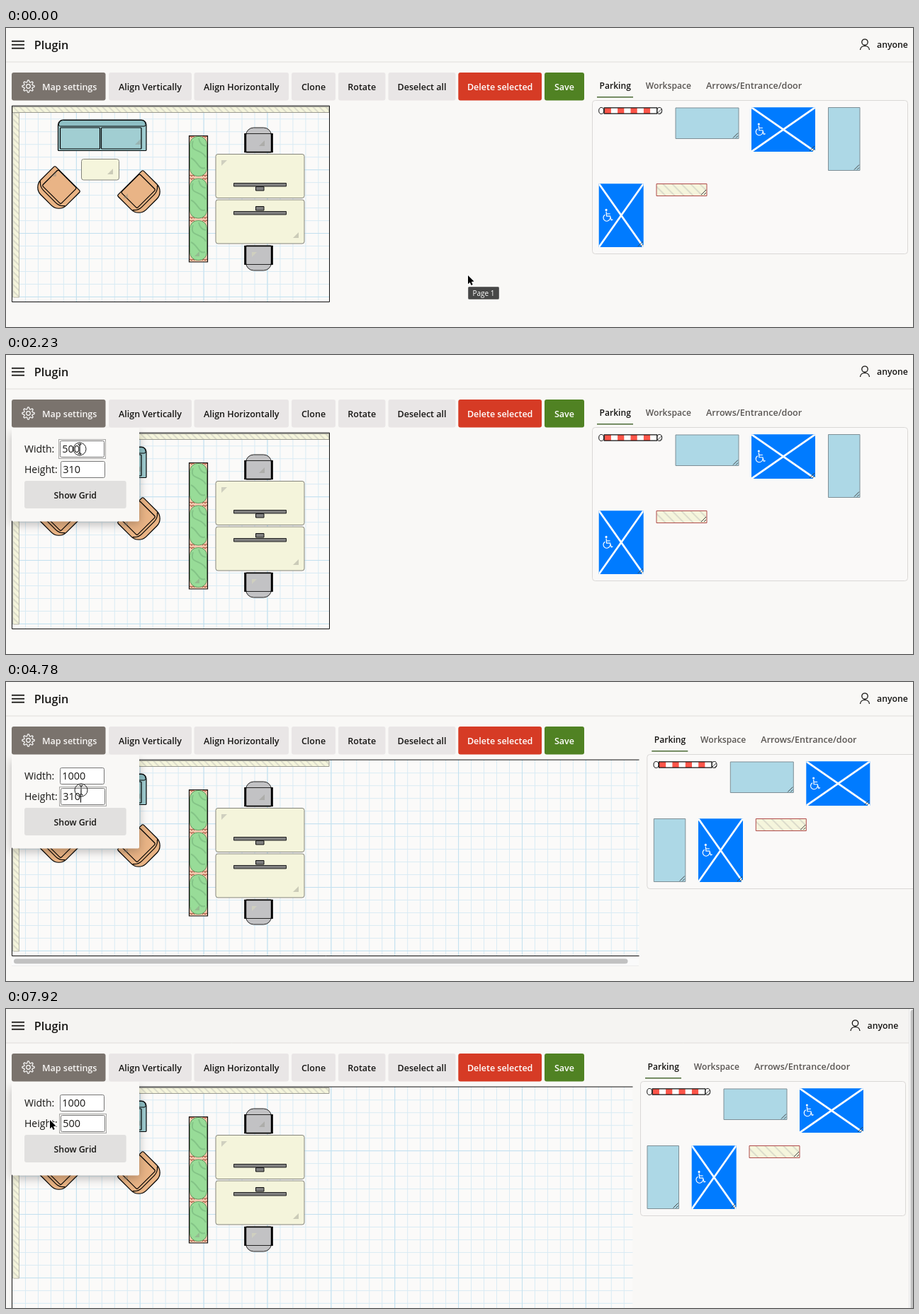
An HTML page with a canvas for the animation above (8 s loop, 1280 by 423 pixels).

```html
<!DOCTYPE html>
<html lang="en">
<head>
<meta charset="utf-8">
<title>Map editor</title>
<style>
html, body { margin: 0; width: 100%; height: 100%; overflow: hidden; background: #f9f8f6; }
canvas { display: block; }
</style>
</head>
<body>
<canvas id="stage" width="1280" height="423"></canvas>
<script>
const c = document.getElementById('stage').getContext('2d');
const LOOP = 8000;
const PAGE = '#f9f8f6', INK = '#161513', BEIGE = '#f5f5dc';

// Cursor stops: time, x, y, shape, click ring
const cursorStops = [
  [0, 652, 350, 'arrow'], [140, 606, 330, 'arrow'], [290, 480, 272, 'arrow'],
  [440, 290, 186, 'arrow'], [590, 122, 112, 'arrow'], [740, 30, 84, 'hand'],
  [890, 74, 91, 'hand'], [1190, 74, 91, 'hand', true], [1330, 74, 91, 'hand'],
  [1630, 80, 100, 'arrow'], [1780, 92, 116, 'arrow'], [1930, 104, 129, 'beam'],
  [2080, 107, 133, 'beam'], [2230, 104, 133, 'beam', true], [2380, 86, 132, 'beam'],
  [2530, 69, 130, 'beam'], [2680, 69, 130, 'arrow'], [4030, 74, 133, 'arrow'],
  [4180, 84, 139, 'beam'], [4330, 95, 147, 'beam'], [4480, 103, 152, 'beam'],
  [4630, 105, 154, 'beam'], [4780, 106, 153, 'beam', true], [4930, 106, 154, 'beam'],
  [5220, 96, 155, 'beam'], [5370, 83, 156, 'beam'], [5520, 69, 157, 'arrow'],
  [5670, 62, 157, 'arrow']
];

// Field states: time, text, caret, first selected digit (-1 for none)
const widthStops = [
  [0, '500', false, -1], [2230, '500', true, -1], [2380, '500', false, 1],
  [2530, '500', false, 0], [3130, '1', true, -1], [3280, '10', true, -1],
  [3430, '100', true, -1], [3580, '1000', true, -1], [4780, '1000', false, -1]
];
const heightStops = [
  [0, '310', false, -1], [4780, '310', true, -1], [5220, '310', false, 2],
  [5370, '310', false, 1], [5520, '310', false, 0], [7020, '5', true, -1],
  [7170, '50', true, -1], [7320, '500', true, -1], [7920, '500', false, -1]
];

const layouts = [
  { time: 0, panel: 827.5, right: 1272.5, bottom: 319.5, mapW: 449, user: 0 },
  { time: 4780, panel: 904.8, right: 1350, bottom: 292.5, mapW: 885, user: 0, hbar: true, narrow: true },
  { time: 7770, panel: 895.5, right: 1269.5, bottom: 292.5, mapW: 876, user: -13.5, vbar: true, narrow: true }
];

const stopAt = (stops, t) => stops.filter(s => s[0] <= t).pop();

function box(x, y, w, h, fill, stroke, r = 0, lw = 1) {
  c.beginPath();
  c.roundRect(x, y, w, h, r);
  if (fill) { c.fillStyle = fill; c.fill(); }
  if (stroke) { c.strokeStyle = stroke; c.lineWidth = lw; c.stroke(); }
}

function line(color, lw, ...p) {
  c.beginPath();
  for (let i = 0; i < p.length; i += 2) c.lineTo(p[i], p[i + 1]);
  c.strokeStyle = color;
  c.lineWidth = lw;
  c.stroke();
}

function shape(fill, stroke, lw, ...p) {
  c.beginPath();
  for (let i = 0; i < p.length; i += 2) c.lineTo(p[i], p[i + 1]);
  c.closePath();
  if (stroke) { c.strokeStyle = stroke; c.lineWidth = lw; c.stroke(); }
  c.fillStyle = fill;
  c.fill();
}

function text(s, x, y, size = 12.5, weight = 600, color = INK, align = 'left') {
  c.font = `${weight} ${size}px "Open Sans", "Noto Sans", sans-serif`;
  c.fillStyle = color;
  c.textAlign = align;
  c.fillText(s, x, y);
}

function within(x, y, w, h, draw) {
  c.save();
  c.beginPath();
  c.rect(x, y, w, h);
  c.clip();
  draw();
  c.restore();
}

function hatch(x, y, w, h, gap, stroke) {
  box(x, y, w, h, BEIGE);
  within(x, y, w, h, () => {
    for (let i = -h; i < w; i += gap) line('#dcdccb', 2, x + i, y, x + i + h, y + h);
  });
  box(x, y, w, h, null, stroke);
}

function gripTriangle(x, y, s = 8, flip) {
  if (flip) shape('#cfcfbf', null, 0, x, y + s, x, y, x + s, y);
  else shape('rgba(140,140,130,.4)', null, 0, x + s, y, x + s, y + s, x, y + s);
}

function gripLines(x, y) {
  line('#444', 1, x - 8, y - 1, x - 1, y - 8);
  line('#444', 1, x - 4, y - 1, x - 1, y - 4);
}

function header(v) {
  if (v.vbar) box(0, 0, 1274, 48, '#f5f4f2');
  line('#dfddda', 1, 0, 48, v.vbar ? 1274 : 1280, 48);
  for (const y of [18, 23, 28]) box(8, y - 0.2, 18, 1.8, INK);
  text('Plugin', 39.7, 30, 16.2);
  const x = 1212 + v.user;
  c.strokeStyle = INK;
  c.lineWidth = 1.3;
  c.beginPath();
  c.arc(x, 20, 4.2, 0, 7);
  c.moveTo(x - 6.5, 31);
  c.bezierCurveTo(x - 6, 23.5, x + 6, 23.5, x + 6.5, 31);
  c.stroke();
  text('anyone', 1229 + v.user, 28, 12.3);
}

function gear(x, y) {
  c.beginPath();
  for (let i = 0; i < 64; i++) {
    const a = i / 64 * Math.PI * 2;
    const r = 7.3 + 1.3 * Math.tanh(3 * Math.cos(a * 8));
    c.lineTo(x + r * Math.cos(a), y + r * Math.sin(a));
  }
  c.closePath();
  c.moveTo(x + 2.8, y);
  c.arc(x, y, 2.8, 0, 7);
  c.strokeStyle = '#fff';
  c.lineWidth = 1.2;
  c.stroke();
}

function dotted(x, y, w, h, color) {
  c.setLineDash([1, 1]);
  box(x, y, w, h, null, color);
  c.setLineDash([]);
}

function toolbar(t) {
  const pressed = t >= 1190 && t < 1630;
  box(8, 63, 132.5, 39.5, pressed ? '#69625c' : '#7a736d', null, 3);
  gear(31.5, 82.5);
  text('Map settings', 51, 87.5, 12.5, 600, '#f8f6f4');
  if (t >= 1190 && t < 2230) dotted(6.5, 61.5, 136, 42, '#5d7a4a');
  const buttons = [
    ['Align Vertically', 145, 117], ['Align Horizontally', 265.5, 133.5],
    ['Clone', 403, 62], ['Rotate', 469, 66.5], ['Deselect all', 539.5, 95],
    ['Delete selected', 638.3, 117.7, '#d63b25'], ['Save', 760, 56, '#508223']
  ];
  for (const [label, x, w, fill] of buttons) {
    box(x, 63, w, 39.5, fill || '#e9e6e6', null, 3);
    text(label, x + w / 2, 87.5, 12.5, 600, fill ? '#fff' : INK, 'center');
  }
}

function grid(w, h) {
  for (const major of [false, true]) {
    const color = major ? '#c3e1ef' : '#d9ebf4';
    const step = major ? 89.87 : 17.974;
    for (let x = step; x < w; x += step) line(color, 1, 9.5 + x, 110, 9.5 + x, 110 + h);
    for (let y = step; y < h; y += step) line(color, 1, 8, 110.8 + y, 8 + w, 110.8 + y);
  }
}

function sofa() {
  box(73.5, 130, 124.5, 43.5, '#9fcdd1', '#000', [7, 7, 1, 1], 1.2);
  box(74.5, 130.5, 122.5, 8.5, '#8ebfc4', '#000', [6, 6, 2, 2]);
  box(76.5, 141, 56, 30, '#a1ced2', '#000', 1, 1.2);
  box(134.5, 141, 56.5, 30, '#a1ced2', '#000', 1, 1.2);
  gripTriangle(182, 157);
}

// Front edge lies on the local x axis, the rounded back points down
function armchair(x, y, mirror) {
  c.save();
  c.translate(x, y);
  if (mirror) c.scale(-1, 1);
  c.rotate(Math.PI / 4);
  box(0, 0, 51, 43, '#e8b384', '#000', [2, 2, 15, 15], 1.2);
  box(7, 0.5, 37, 32, '#e9b486', '#000', 2, 1.2);
  c.beginPath();
  c.moveTo(1, 30);
  c.quadraticCurveTo(6, 36, 13, 36);
  c.lineTo(38, 36);
  c.quadraticCurveTo(45, 36, 50, 30);
  c.stroke();
  c.restore();
}

function bush(y) {
  box(258.5, y, 26, 60, '#f3c8ad');
  within(259, y, 25, 60, () => {
    for (const edge of [y + 3, y + 58]) {
      for (const x of [260, 264, 279, 283]) {
        c.beginPath();
        c.arc(x, edge, 1.8, Math.PI, 0);
        c.strokeStyle = '#a04a36';
        c.lineWidth = 1;
        c.stroke();
      }
    }
  });
  box(259.5, y + 1.5, 24, 56, '#98dc98', '#4d8a50', 11, 0.8);
  c.strokeStyle = '#84c487';
  c.lineWidth = 2;
  c.beginPath();
  c.moveTo(264, y + 8);
  c.bezierCurveTo(258, y + 25, 276, y + 18, 282, y + 31);
  c.moveTo(261, y + 32);
  c.bezierCurveTo(270, y + 35, 271, y + 49, 281, y + 46);
  c.moveTo(272, y + 4);
  c.quadraticCurveTo(274, y + 14, 282, y + 15);
  c.stroke();
}

function desk(y, screenY, standY) {
  box(296, y, 125, 62, '#f4f4db', '#85857c', 3);
  box(321.5, screenY, 74, 4.5, '#808080', '#222');
  box(352.5, standY, 11.5, 5.5, '#808080', '#111');
}

function officeChair(x, y, flip) {
  c.save();
  c.translate(x, y);
  if (flip) c.scale(1, -1);
  box(-18, -18, 36, 35, '#c2c2c4', '#222', [11, 11, 1, 1]);
  line('#222', 1, -18, -9.5, 18, -9.5);
  line('#000', 1.5, -20, 16.5, 20, 16.5);
  for (const side of [-1, 1]) line('#000', 3, side * 18.8, -10, side * 18.8, 17);
  c.restore();
}

function map(v) {
  const h = v.vbar ? 320 : 277.5;
  within(8, 109, v.mapW + 0.5, h + 1.5, () => {
    box(8, 110, v.mapW, h, '#fbfaf9');
    grid(v.narrow ? 900 : 449, h);
    hatch(9, 111.5, 447, 8, 9, '#9a9a90');
    hatch(10, 120, 8.5, 261, 9, '#b5b5aa');
    sofa();
    box(106.5, 185.5, 53, 29.5, BEIGE, '#85857c', 3);
    gripTriangle(143, 199);
    armchair(69, 195);
    armchair(193, 201, true);
    gripTriangle(64, 203, 7);
    gripTriangle(165, 234, 7);
    for (const y of [152, 211.5, 271]) bush(y);
    box(258.5, 152.5, 26, 178.5, null, '#111', 0, 1.2);
    gripTriangle(266, 316, 7);
    officeChair(356.5, 159);
    gripTriangle(357, 159, 8);
    desk(178.5, 219.5, 224.5);
    gripTriangle(304, 187, 8, true);
    desk(243, 259.5, 252.5);
    gripTriangle(405, 289);
    officeChair(356.5, 325, true);
    gripTriangle(347, 317, 7, true);
    box(8.5, 110.1, v.narrow ? 900 : 448, v.vbar ? 450 : 277.4, null, '#111');
  });
  if (v.hbar) {
    box(8, 389, 885, 12, '#fafafa');
    line('#ececec', 1, 8, 401.5, 893, 401.5);
    box(11, 391.5, 866.5, 7, '#c1c1c1', null, 3.5);
  }
}

function barrier(x) {
  for (const dx of [3.5, 85.5]) {
    c.beginPath();
    c.ellipse(x + dx, 117, 3.5, 4.5, 0, 0, 7);
    c.fillStyle = '#fff';
    c.fill();
    c.strokeStyle = '#111';
    c.lineWidth = 1;
    c.stroke();
  }
  box(x + 7.5, 112.8, 74.5, 8.4, '#fff');
  for (let i = 0; i < 8; i += 2) box(x + 8 + i * 9.2, 113, 9.2, 8, '#ff5549');
  box(x + 7.5, 112.8, 74.5, 8.4, null, '#111', 0, 1.2);
  gripLines(x + 90, 122);
}

function accessibleSpot(x, y, w, h) {
  box(x, y, w, h, '#007bff');
  within(x, y, w, h, () => {
    line('#fff', 2.7, x, y, x + w, y + h);
    line('#fff', 2.7, x + w, y, x, y + h);
  });
  c.save();
  c.translate(x + 12, y + h / 2);
  c.scale(1.1, 1.1);
  c.beginPath();
  c.arc(-1.5, -7, 1.4, 0, 7);
  c.fillStyle = '#fff';
  c.fill();
  line('#fff', 1.1, -1.5, -5, -1, 1, 3.5, 1, 5, 6, 7, 5.5);
  line('#fff', 1, -1, -2, 3.5, -2);
  c.beginPath();
  c.arc(-0.8, 3, 4.4, -0.1, 4.2);
  c.stroke();
  c.restore();
  gripLines(x + w, y + h);
}

function blueSpot(x, y, w, h) {
  box(x, y, w, h, '#add8e6', '#7f8f96');
  gripLines(x + w, y + h);
}

function palette(v) {
  const x = v.panel, left = x + 9.5;
  text('Parking', x + 10, 86, 12.1, 600);
  text('Workspace', x + 75.3, 86, 12.1, 600, '#5a5653');
  text('Arrows/Entrance/door', x + 160.5, 86, 12.6, 600, '#5a5653');
  box(x, 102.5, v.right - x, v.bottom - 102.5, '#faf9f8', '#dad8d6', 4);
  box(x + 6.5, 97, 51, 1.6, '#4a6a35');
  barrier(left - 0.3);
  blueSpot(left + 108, 113, 89, 43.5);
  accessibleSpot(left + 215, 112.3, 90, 62.7);
  if (v.narrow) {
    blueSpot(left, 193.5, 44.5, 89);
    accessibleSpot(left + 62.7, 193.2, 63, 89.8);
    hatch(left + 144, 193.5, 71, 17, 13, '#b04a4a');
    gripLines(left + 215, 210);
  } else {
    blueSpot(left + 323.5, 112.5, 44.5, 89);
    accessibleSpot(left - 0.3, 220.2, 63, 89.8);
    hatch(left + 81, 220.5, 71, 17, 13, '#b04a4a');
    gripLines(left + 152, 237);
  }
}

function field(x, y, [, value, caret, from], focused) {
  box(x, y, 62, 23, '#fff', '#767676', 2);
  c.font = '400 14.4px "Open Sans", "Noto Sans", sans-serif';
  const start = x + 2.8, end = start + c.measureText(value).width;
  if (from >= 0) {
    const lead = c.measureText(value.slice(0, from)).width;
    box(start + lead, y + 3, end - start - lead, 17.5, '#b3d7fe');
  }
  text(value, start, y + 16.7, 14.4, 400);
  if (caret) line('#000', 1, Math.round(end) + 0.5, y + 3, Math.round(end) + 0.5, y + 20);
  if (focused) dotted(x - 2, y - 2, 66, 27, '#555');
}

function popup(t) {
  c.save();
  c.shadowColor = 'rgba(20,18,15,.28)';
  c.shadowBlur = 13;
  c.shadowOffsetY = 4;
  box(8, 107, 180, 128.5, PAGE, null, 2);
  c.restore();
  box(8, 103, 180, 10, PAGE);
  text('Width:', 26, 138, 14, 400);
  text('Height:', 26, 167, 14, 400);
  field(76.5, 121.5, stopAt(widthStops, t), t >= 2230 && t < 4780);
  field(77.5, 150.5, stopAt(heightStops, t), t >= 4780);
  box(26, 178, 143.7, 39, '#e1e0df', null, 3);
  text('Show Grid', 97.8, 202.5, 12.3, 600, INK, 'center');
}

function cursor([, x, y, kind, ring]) {
  c.save();
  c.translate(x, y);
  c.lineJoin = 'round';
  if (kind === 'arrow') {
    shape('#000', '#fff', 2, 0, 0, 0, 12.2, 2.7, 9.7, 4.6, 14, 6.7, 13, 4.8, 8.9, 8.5, 8.6);
  } else if (kind === 'beam') {
    for (const [color, w] of [['rgba(255,255,255,.8)', 2.4], ['#111', 1.1]]) {
      line(color, w, 0, -5.5, 0, 5.5);
      line(color, w, -2.5, -7, 0, -5.5, 2.5, -7);
      line(color, w, -2.5, 7, 0, 5.5, 2.5, 7);
    }
  } else {
    c.beginPath();
    c.moveTo(-3.2, 0);
    c.lineTo(-4, -5);
    c.quadraticCurveTo(-2.4, -8, -1, -5);
    c.lineTo(-0.3, -2);
    c.quadraticCurveTo(1.6, -3.2, 2.4, -1.4);
    c.quadraticCurveTo(4.2, -2.2, 4.6, -0.6);
    c.quadraticCurveTo(7, -1, 6.5, 2);
    c.lineTo(5.2, 7.5);
    c.lineTo(-1.6, 7.5);
    c.quadraticCurveTo(-2.5, 4.5, -5.5, 1.6);
    c.quadraticCurveTo(-5.3, -0.5, -3.2, 0);
    c.closePath();
    c.fillStyle = '#fff';
    c.fill();
    c.strokeStyle = '#000';
    c.lineWidth = 1.1;
    c.stroke();
    for (const dx of [0, 2, 4]) line('#000', 0.8, dx, 2, dx, 5);
  }
  if (ring) {
    c.beginPath();
    c.arc(0, 0, 9, 0, 7);
    c.strokeStyle = '#222';
    c.lineWidth = 1;
    c.stroke();
  }
  c.restore();
}

function tooltip() {
  box(652.5, 366.5, 43, 17, '#474747', '#6a6a6a', 1);
  text('Page 1', 674, 378.5, 10, 500, '#fff', 'center');
}

function draw(t) {
  const v = layouts.filter(l => l.time <= t).pop();
  box(0, 0, 1280, 423, PAGE);
  header(v);
  map(v);
  palette(v);
  if (t >= 1330) popup(t);
  toolbar(t);
  if (v.vbar) {
    box(1274, 0, 6, 423, '#fafafa');
    line('#e6e6e6', 1, 1274.5, 0, 1274.5, 423);
    box(1276.5, 1, 7, 440, '#c1c1c1', null, 3.5);
  }
  if (t < 140) tooltip();
  cursor(stopAt(cursorStops, t));
}

const begin = performance.now();
function tick() {
  draw((performance.now() - begin) % LOOP);
  requestAnimationFrame(tick);
}
tick();
</script>
</body>
</html>
```
